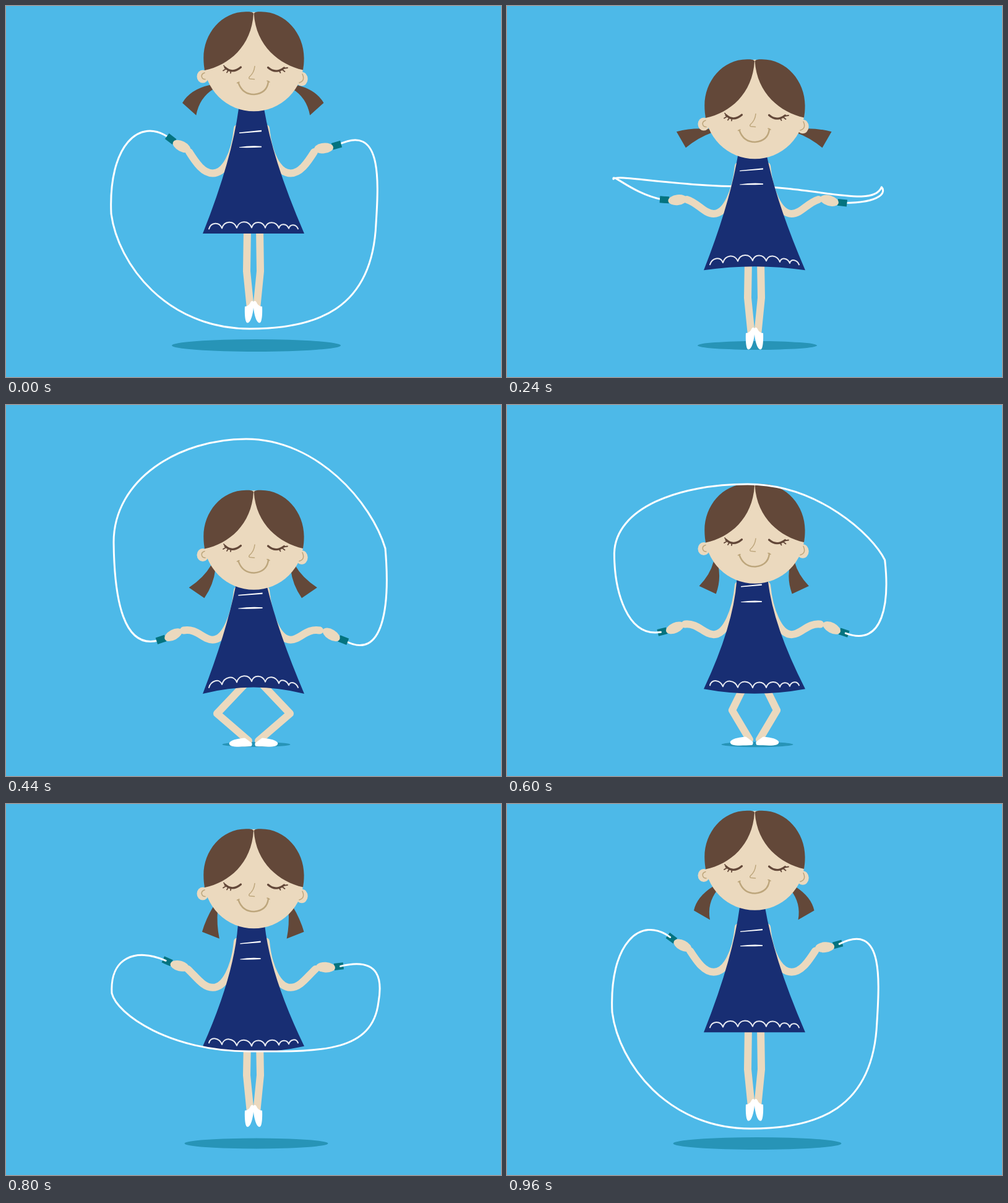
These frames come from a looping animation (800 px wide and 600 px high, 1 s). An HTML page:

```html
<!DOCTYPE html>
<html lang="en">
<head>
<meta charset="utf-8">
<title>Skipping rope</title>
<style>
html, body { margin: 0; width: 100%; height: 100%; overflow: hidden; background: #4db9e8; }
svg { display: block; width: 100vw; height: 100vh; }
.skin { fill: #ebd9be; }
.limb { fill: none; stroke: #ebd9be; stroke-width: 12; stroke-linecap: round; stroke-linejoin: round; }
.hair { fill: #634839; }
.lash { fill: none; stroke: #634839; stroke-linecap: round; }
.line { fill: none; stroke: #bda67c; stroke-linecap: round; }
.rope { fill: none; stroke: #fff; stroke-width: 3; stroke-linecap: round; stroke-linejoin: round; }
.grip { fill: #04737f; }
.trim { fill: none; stroke: #fff; stroke-width: 2; stroke-linecap: round; stroke-linejoin: round; opacity: .9; }
</style>
</head>
<body>
<svg viewBox="0 0 800 600">
  <ellipse id="shadow" cx="404.5" cy="549" fill="#2794b7"/>
  <path id="ropeBack" class="rope"/>
  <g id="tails" class="hair">
    <path id="tailL"/>
    <path id="tailR" transform="matrix(-1 0 0 1 798.5 0)"/>
  </g>
  <path id="legL" class="limb"/>
  <path id="legR" class="limb" transform="matrix(-1 0 0 1 800 0)"/>
  <path id="shoeL" fill="#fff"/>
  <path id="shoeR" fill="#fff" transform="matrix(-1 0 0 1 800 0)"/>
  <path id="armL" class="limb"/>
  <path id="armR" class="limb" transform="matrix(-1 0 0 1 794 0)"/>
  <path id="dress" fill="#182e73"/>
  <path id="stripes" fill="#fff"/>
  <path id="hem" class="trim"/>
  <g id="head">
    <ellipse class="skin" cx="318" cy="114" rx="9.5" ry="10.5"/>
    <ellipse class="skin" cx="478" cy="118" rx="9.7" ry="11.3"/>
    <ellipse class="skin" cx="400.5" cy="90" rx="80.5" ry="80.3"/>
    <path class="hair" d="M400 12C398 9 392 9.300 388 9.300C348 9.300 319.300 45 319.300 84C319.300 92 320 98 321 104C360 96 397 65 400 12Z"/>
    <path class="hair" d="M400.600 12C403 9 408 9.300 412 9.300C452 9.300 481.600 45 481.600 84C481.600 92 481 98 480 103.500C442 95 404 65 400.600 12Z"/>
    <path class="line" stroke-width="1.5" d="M321 108Q315 110 316.500 115Q318 119 322 118.500M479 110Q484 121 474 124"/>
    <path class="lash" stroke-width="3.2" d="M354 99.500Q366 110.500 379.500 99M423.500 99.500Q436 110.500 449.500 100"/>
    <path class="lash" stroke-width="1.8" d="M352 96.500L355 100M351 104.500L356 101.500M357 107.500L359.500 103.500M363 108.500L363.500 104.500M455 100L448 101M450.500 106L446.500 103M443.500 108L441.500 104.500"/>
    <path class="line" stroke-width="1.5" d="M402 97.500Q401 108 393.500 114.500Q391 118 396 118L401.500 118.500"/>
    <path class="line" stroke-width="2.4" d="M375.500 124Q382 143 401 143Q422 141 424 122"/>
    <path class="line" stroke-width="1.6" d="M373.500 124.500L377 123M422 121L426 123"/>
  </g>
  <g id="handL">
    <rect class="grip" x="-7.5" y="-5.5" width="15" height="11" transform="translate(-21.300 -2.600) rotate(10)"/>
    <ellipse class="skin" rx="15.5" ry="8.4"/>
  </g>
  <g id="handR">
    <rect class="grip" x="-7.5" y="-5.5" width="15" height="11" transform="translate(21.300 -2.600) rotate(-10)"/>
    <ellipse class="skin" rx="15.5" ry="8.4"/>
  </g>
  <path id="ropeFront" class="rope"/>
</svg>
<script>
const LOOP = 1000, STEP = 40;
const TIMES = [0, 160, 240, 440, 600, 800, 960];
const N = TIMES.length;

// key values at TIMES; every other pose follows from these
const keys = {
  drop: [0, 29, 77, 128.5, 118.5, 31, 1.5],   // how far the head has sunk
  ropeY: [522, 396, 292, 55, 128, 400, 525],  // middle of the rope
  shade: [136.5, 129, 96.5, 55, 58, 116, 136],
  sway: [0, -4, -6, -10.5, 7.5, 9, 0],        // bulge of the dress hem
  tail: [52, 24, 16, 68, 86, 93, 76]          // degrees below horizontal
};

const LANDED = 77, LOWEST = 128.5;
const ROPE_TOP = 55, ROPE_BOTTOM = 522;
const TOE_SHOE = "M386 486C391 486 394 482 395.5 478.5C397 476 400 476.5 400.5 480C400.5 490 397 513 390 512.5C386 512 385.5 495 386 486Z";
const FLAT_SHOE = "M361 546C366 540 378 539.5 386 538.5C390 541 396 546 397.5 547C398 549 397 552 396 552C380 552.5 358 555 361 546Z";
const SCALLOPS = [21, 24, 24, 22, 22, 16, 15];

const el = {};
document.querySelectorAll("[id]").forEach(e => el[e.id] = e);
const set = (id, attrs) => { for (const k in attrs) el[id].setAttribute(k, attrs[k]); };
const draw = (id, d) => set(id, { d });
const pair = (id, d) => { draw(id + "L", d); draw(id + "R", d); };
const mix = (a, b, k) => a + (b - a) * k;
const clamp = k => Math.min(1, Math.max(0, k));
const rad = deg => deg * Math.PI / 180;

// smooth periodic curve through the values at TIMES
function curve(vals, t) {
  let i = N - 1;
  while (TIMES[i] > t) i--;
  const at = k => vals[(k + N) % N];
  const when = k => TIMES[(k + N) % N] + LOOP * Math.floor(k / N);
  const rate = k => (at(k + 1) - at(k)) / (when(k + 1) - when(k));
  const slope = k => {
    const a = when(k) - when(k - 1), b = when(k + 1) - when(k);
    return (b * rate(k - 1) + a * rate(k)) / (a + b);
  };
  const h = when(i + 1) - when(i), u = (t - when(i)) / h, v = 1 - u;
  return v * v * (1 + 2 * u) * at(i) + u * u * (3 - 2 * u) * at(i + 1)
    + h * u * v * (v * slope(i) - u * slope(i + 1));
}

function drawTails(angle, t) {
  const a = rad(angle), b = rad(68 - angle / 2), len = 47 + .09 * angle;
  const curl = 2 + 10 * Math.cos(2 * Math.PI * (t - 30) / LOOP);
  const x = 322 + .14 * angle, y = 119 + .17 * angle;
  const tipX = 328 - len * Math.cos(a), tipY = 126 + len * Math.sin(a);
  const ex = 15 * Math.cos(b), ey = 15 * Math.sin(b);
  const bow = (x1, y1, x2, y2) =>
    `Q${(x1 + x2) / 2 - curl * Math.sin(a)} ${(y1 + y2) / 2 - curl * Math.cos(a)} ${x2} ${y2}`;
  pair("tail", `M${x} ${y}` + bow(x, y, tipX - ex, tipY - ey)
    + `L${tipX + ex} ${tipY + ey}` + bow(tipX + ex, tipY + ey, x + 7, y + 6) + "L362 118Z");
}

function drawLegs(drop) {
  const foot = 43 * Math.min(1, Math.max(0, drop) / LANDED) ** 1.635;
  const squat = clamp((drop - LANDED) / (LOWEST - LANDED));
  const flat = clamp(squat / .6), sink = -10 * (1 - squat);
  const ankleX = mix(394.5, 392, flat), ankleY = mix(484 + foot, 543 + sink, flat);
  pair("leg", `M390 ${360 + .68 * drop}L${389 - 48 * squat ** 3} ${429 + foot + 27 * squat}L${ankleX} ${ankleY}`);
  const onSole = flat > .5;
  pair("shoe", onSole ? FLAT_SHOE : TOE_SHOE);
  const dy = onSole ? sink : foot;
  set("shoeL", { transform: `translate(0 ${dy})` });
  set("shoeR", { transform: `matrix(-1 0 0 1 800 ${dy})` });
}

function drawDress(drop, sway) {
  const top = drop + 166, corner = 368 + .77 * drop;
  const neckL = 376 - .04 * drop, neckR = 793 - neckL;
  const bend = 13 + sway / 2, y = mix(top, corner, .42);
  const sideL = mix(neckL, 318, .42) + bend, sideR = mix(neckR, 482, .42) - bend;
  draw("dress", `M${neckL} ${top - 12}V${top}Q${sideL} ${y} 318 ${corner}`
    + `Q400 ${corner + 2 * sway} 482 ${corner}Q${sideR} ${y} ${neckR} ${top}V${top - 12}Z`);

  const half = 18 - .15 * sway, a = 395 - half, b = 395 + half;
  const s1 = 203.5 + .77 * drop - .35 * sway, s2 = 228 + .77 * drop - .15 * sway;
  draw("stripes", `M${a} ${s1 + 1}L${b} ${s1 - 2.7}V${s1 - .3}L${a} ${s1 + 2.4}Z`
    + `M${a} ${s2 + .2}Q395 ${s2 - 2.6} ${b} ${s2 - 1.2}V${s2 + .6}Q395 ${s2 + 1.4} ${a} ${s2 + 1}Z`);

  const hemY = x => corner - 7 + (sway - 2.5) * (1 - ((x - 400) / 82) ** 2);
  let x = 328, d = `M${x} ${hemY(x)}`;
  for (const w of SCALLOPS) {
    const rise = .52 * w;
    d += `C${x + .15 * w} ${hemY(x) - rise} ${x + .8 * w} ${hemY(x + w) - rise} ${x + w} ${hemY(x + w)}`;
    x += w;
  }
  draw("hem", d);
}

function drawArms(drop) {
  const elbow = 270.5 + .85 * drop, shoulder = 198 + .79 * drop;
  pair("arm", `M374 ${shoulder}C370 ${shoulder + 42} 354 ${elbow} 334 ${elbow}`
    + `C319 ${elbow} 308 ${255 + .82 * drop} ${296 - .07 * drop} ${236 + drop}`);
}

// places a hand and returns the end of the rope in its grip
function placeHand(id, x, y, angle, side) {
  set(id, { transform: `translate(${x} ${y}) rotate(${angle})` });
  const c = Math.cos(rad(angle)), s = Math.sin(rad(angle)), u = 24 * side, v = -3;
  return [x + u * c - v * s, y + u * s + v * c];
}

function drawRope(drop, ropeY, front) {
  const [lx, ly] = placeHand("handL", 284 - .105 * drop, 227 + 1.125 * drop, 27 - .43 * drop, -1);
  const [rx, ry] = placeHand("handR", 513.5 + .095 * drop, 230 + 1.1 * drop, .29 * drop - 6, 1);
  const low = (ropeY - ROPE_TOP) / (ROPE_BOTTOM - ROPE_TOP);
  // a point that travels from its overhead place to its underfoot place
  const p = (x1, y1, x2, y2, y = 0) => `${mix(x1, x2, low)} ${y + mix(y1, y2, low)} `;
  const d = `M${lx} ${ly}`
    + "C" + p(190, 17, 216, -35, ly) + p(175, 315, 165, 225) + p(174, 222, 170, 336)
    + "C" + p(174, 120, 181, 418) + p(280, 55, 260, 522) + p(388, 55, 394, 522)
    + "C" + p(503, 55, 500, 522) + p(591, 158, 592, 492) + p(613, 232, 598, 352)
    + "C" + p(621, 325, 603, 275) + p(610, 34, 606, -34, ry) + `${rx} ${ry}`;
  draw("ropeBack", front ? "" : d);
  draw("ropeFront", front ? d : "");
}

function render(t) {
  const now = {};
  for (const k in keys) now[k] = curve(keys[k], t);
  const { drop, ropeY, shade, sway, tail } = now;
  const sunk = { transform: `translate(0 ${drop})` };
  set("head", sunk);
  set("tails", sunk);
  set("shadow", { rx: shade, ry: shade * .073 });
  drawTails(tail, t);
  drawLegs(drop);
  drawArms(drop);
  drawDress(drop, sway);
  drawRope(drop, ropeY, t >= LOOP / 2);
}

function tick() {
  render(Math.floor(performance.now() % LOOP / STEP) * STEP);
  requestAnimationFrame(tick);
}
tick();
</script>
</body>
</html>
```
